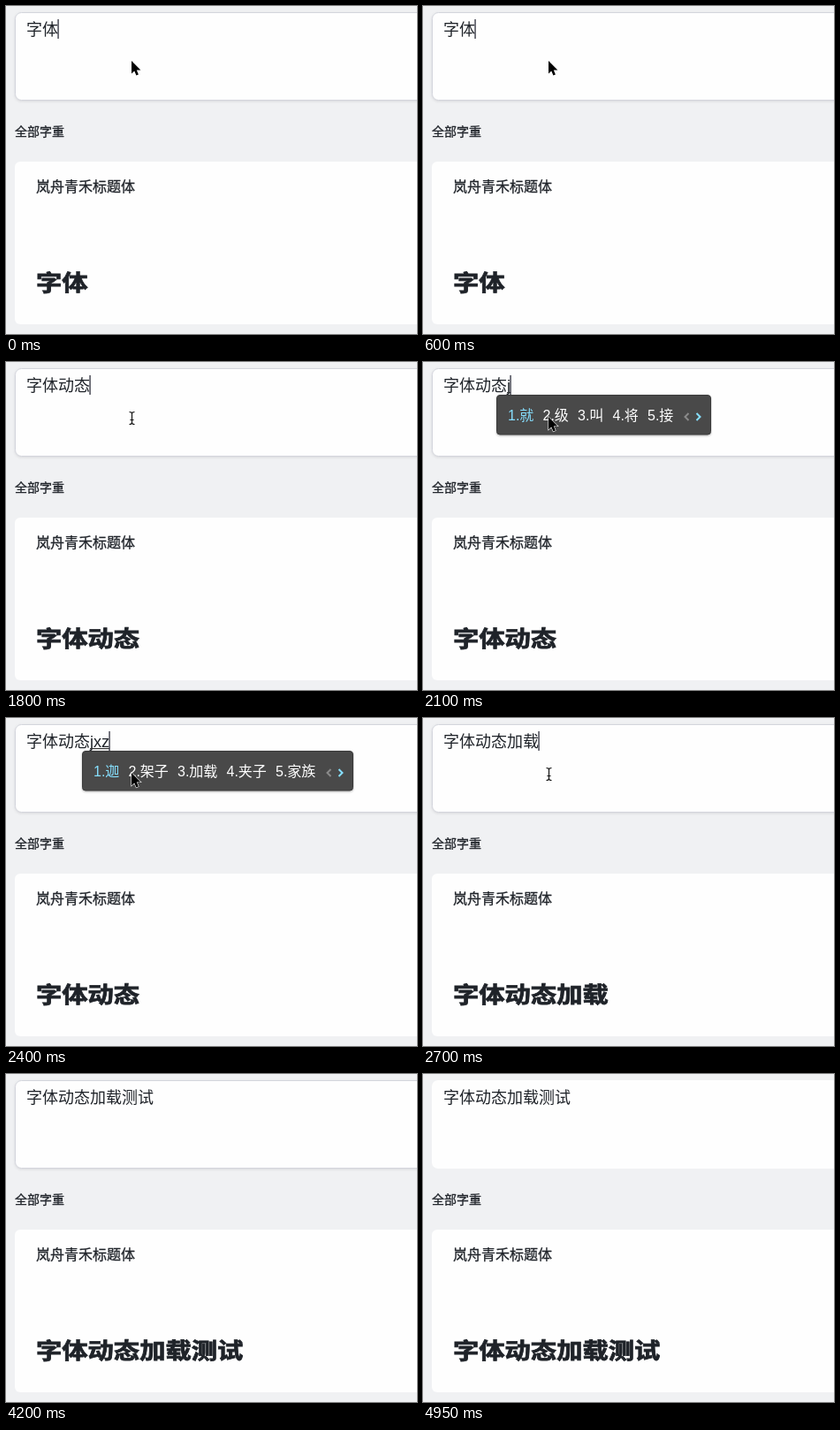
Write an HTML page that moves like this. It is 465 px wide and 371 px high and loops after 5.05 s.

```html
<!DOCTYPE html>
<html lang="zh-CN">
<head>
<meta charset="utf-8">
<title>字体动态加载测试</title>
<style>
  html, body { margin: 0; width: 100%; height: 100%; overflow: hidden; background: #f0f1f3; }
  svg { display: block; width: 465px; height: 371px; }
  text { font-family: "Liberation Sans", "Noto Sans CJK SC", "Noto Sans CJK", sans-serif; fill: #1f2329; white-space: pre; }
  .medium { stroke: #1f2329; stroke-width: .3; }
  .display { font-size: 29.3px; font-weight: 900; stroke: #1f2329; stroke-width: .9; }
  .fallback { font-size: 32px; }
  #field.focus { stroke: #d3d5dc; filter: drop-shadow(0 1px 1.5px rgba(30, 32, 45, .12)); }
  #panel { filter: drop-shadow(0 1px 1px rgba(0, 0, 0, .3)); }
  #items text { font-size: 16px; fill: #fff; }
  #items text:first-child { fill: #86dfff; }
  .chevron { fill: none; stroke-width: 2; }
</style>
</head>
<body>
<svg viewBox="0 0 465 371">
  <rect width="465" height="371" fill="#f0f1f3"/>
  <rect id="field" x="10.5" y="7.5" width="480" height="99" rx="7" fill="#fefefe"/>
  <text id="typed" x="23" y="33" font-size="18"></text>
  <rect id="underline" y="34" height="1.2" fill="#333"/>
  <rect id="caret" y="15" width="1.3" height="22" fill="#2b2d3a"/>

  <text class="medium" x="10" y="147" font-size="14">全部字重</text>
  <rect x="10" y="176" width="480" height="184" rx="6" fill="#fefefe"/>
  <text class="medium" x="34" y="210.3" font-size="16">岚舟青禾标题体</text>
  <text id="loaded" class="display" transform="translate(34 322) scale(1 .87)"></text>
  <text id="pending" class="fallback" y="323.5"></text>

  <g id="popup">
    <rect id="panel" y="37.5" height="44.5" rx="3.5" fill="#494949" stroke="#3a3a3a"/>
    <g id="items"></g>
    <g id="chevrons">
      <path class="chevron" d="M-25.5 58l-4 4 4 4" stroke="#8a8a8a"/>
      <path class="chevron" d="M-16.5 58l4 4-4 4" stroke="#86dfff"/>
    </g>
  </g>

  <path id="arrow" d="M0 0v14.6l3.3-3.1 2.1 5 2.5-1.1-2.1-4.9h4.6z" fill="#000" stroke="#fff" stroke-width="1.1" paint-order="stroke"/>
  <g id="beam" fill="none">
    <path d="M-3-7q3 0 3 2V5q0 2-3 2M3-7q-3 0-3 2M3 7q-3 0-3-2M-2 2H2" stroke="#111" stroke-width="1.2"/>
  </g>
</svg>
<script>
const $ = id => document.getElementById(id);
const LOOP = 5050;
const LINE = '字体动态加载测试';
const arrow = (x, y) => ({ kind: 'arrow', x, y });
const beam = (x, y) => ({ kind: 'beam', x, y });
const pop = (x, width, list) => ({ x, width, list: list.split(' ') });
const overPopup = arrow(142, 62), overField = beam(142.5, 63.5);

// Each step changes only the listed properties; ready + pending count preview glyphs.
const steps = [
  [0, { done: 2, keys: '', ready: 2, pending: 0, caret: true, focus: true, popup: null, cursor: overPopup }],
  [150, { caret: false }],
  [600, { caret: true }],
  [1200, { keys: 'ds', popup: pop(57, 243, '动 东 懂 冻 栋') }],
  [1500, { keys: 'dst', popup: pop(57, 307, '动态 动听 冬天 动弹 动') }],
  [1650, { done: 4, keys: '', ready: 3, pending: 1, popup: null, cursor: overField }],
  [1800, { ready: 4, pending: 0 }],
  [2100, { keys: 'j', popup: pop(83, 243, '就 级 叫 将 接'), cursor: overPopup }],
  [2250, { keys: 'jx', popup: pop(86, 253, '迦 家乡 继续 惊喜') }],
  [2400, { keys: 'jxz', popup: pop(86, 307, '迦 架子 加载 夹子 家族') }],
  [2550, { done: 6, keys: '', pending: 2, popup: null, cursor: overField }],
  [2700, { ready: 6, pending: 0 }],
  [3000, { keys: 'ce', popup: pop(128, 249, '测试 侧视 侧室 册'), cursor: overPopup }],
  [3300, { done: 8, keys: '', ready: 8, popup: null, cursor: overField }],
  [3900, { caret: false }],
  [4050, { cursor: beam(274.5, 50) }],
  [4200, { cursor: null }],
  [4350, { caret: true }],
  [4500, { cursor: arrow(464, 362) }],
  [4650, { cursor: null }],
  [4950, { caret: false, focus: false }]
];

const show = (id, on) => $(id).setAttribute('visibility', on ? 'visible' : 'hidden');
const set = (id, attrs) => Object.entries(attrs).forEach(([k, v]) => $(id).setAttribute(k, v));

function drawPopup(popup) {
  $('popup').style.display = popup ? '' : 'none';
  if (!popup) return;
  const { x, width, list } = popup;
  set('panel', { x: x + .5, width: width - 1 });
  set('chevrons', { transform: `translate(${x + width})` });
  let left = x + 13;
  $('items').replaceChildren(...list.map((word, i) => {
    const item = document.createElementNS('http://www.w3.org/2000/svg', 'text');
    item.textContent = `${i + 1}.${word}`;
    item.setAttribute('x', left);
    item.setAttribute('y', 66.4);
    left += 23.5 + 16 * word.length;
    return item;
  }));
}

function draw(s) {
  const start = 23 + 18 * s.done;
  $('typed').textContent = LINE.slice(0, s.done) + s.keys;
  const end = 23 + $('typed').getComputedTextLength();
  set('underline', { x: start, width: Math.max(0, end - start) });
  set('caret', { x: end - .6 });
  show('caret', s.caret);
  $('field').classList.toggle('focus', s.focus);
  set('field', s.focus ? { x: 10.5, y: 7.5, height: 99 } : { x: 10, y: 7, height: 100 });

  $('loaded').textContent = LINE.slice(0, s.ready);
  $('pending').textContent = LINE.slice(s.ready, s.ready + s.pending);
  set('pending', { x: 34 + 29.3 * s.ready });
  drawPopup(s.popup);

  for (const kind of ['arrow', 'beam']) {
    const on = s.cursor?.kind === kind;
    show(kind, on);
    if (on) set(kind, { transform: `translate(${s.cursor.x} ${s.cursor.y})` });
  }
}

let shown = -1;
const origin = performance.now();
function tick(now) {
  const t = Math.max(0, now - origin) % LOOP;
  const past = steps.filter(([at]) => at <= t);
  if (past.length !== shown) {
    shown = past.length;
    draw(Object.assign({}, ...past.map(([, change]) => change)));
  }
  requestAnimationFrame(tick);
}
tick(origin);
</script>
</body>
</html>
```
